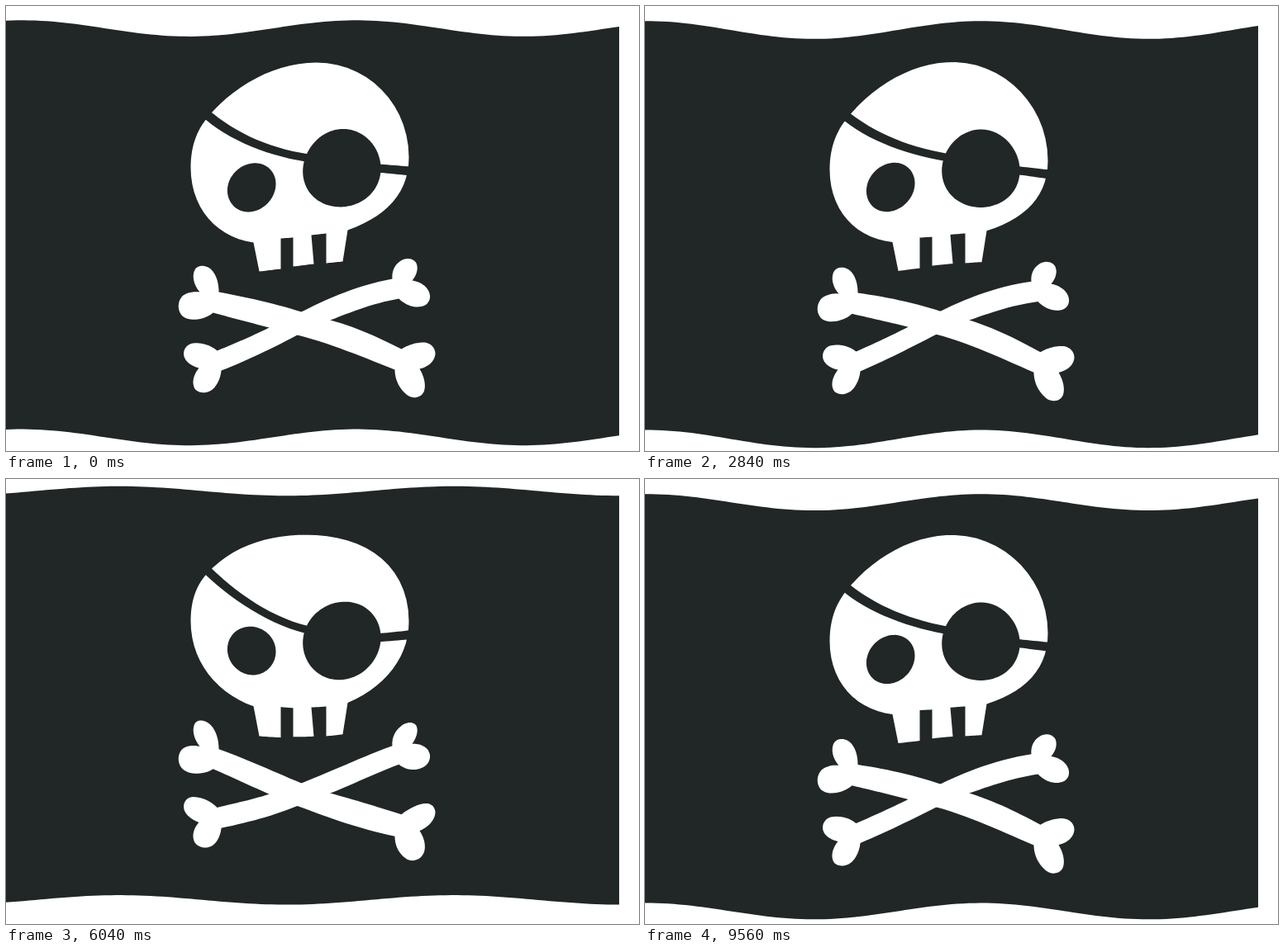
Animation of 766 by 539 pixels, one loop 9.6 s. Source, as an HTML page:

```html
<!DOCTYPE html>
<html lang="en">
<head>
<meta charset="utf-8">
<title>Pirate flag</title>
<style>
html, body { margin: 0; width: 100%; height: 100%; overflow: hidden; background: #fff; }
svg { display: block; width: 766px; height: 539px; }
</style>
</head>
<body>
<svg id="stage" viewBox="0 0 766 539"></svg>
<script>
const LOOP = 9600, STEP = 40, WAVE_MS = 960, SWELL_MS = 4800;
const DARK = '#212626', WHITE = '#fff';
const TAU = Math.PI * 2;
const K = TAU / 405;
const PIN = TAU / 12;

// Wave height swells and fades twice per loop.
const SWELL = [9.8, 8.1, 5.8, 6.3, 8.7, 11.5, 13.2, 11.3];

function height(t) {
  const n = SWELL.length;
  const p = (t % SWELL_MS) / SWELL_MS * n;
  const i = Math.floor(p), f = p - i;
  const [a, b, c, d] = [-1, 0, 1, 2].map(o => SWELL[(i + o + n) % n]);
  return b + f / 2 * (c - a + f * (2 * a - 5 * b + 4 * c - d + f * (3 * (b - c) + d - a)));
}

// Vertical shift at time t: a travelling wave, held still near the middle of the flag.
function waveAt(t) {
  const h = height(t), phase = TAU * t / WAVE_MS;
  const pin = Math.cos(phase + PIN);
  return x => h * (pin - Math.cos(K * (x - 19) - phase));
}

// Flattens an absolute M/L/C path, keeping its corners exact.
function flatten(d) {
  const pts = [];
  let x = 0, y = 0;
  for (const [, cmd, args] of d.matchAll(/([MLC])([^MLC]*)/g)) {
    const v = args.trim().split(/\s+/).map(Number);
    if (cmd === 'M') {
      pts.push([v[0], v[1]]);
    } else {
      const c = cmd === 'C' ? v : [x, y, ...v, ...v];
      for (let i = 1; i <= 14; i++) {
        const s = i / 14, r = 1 - s;
        const mix = (p0, p1, p2, p3) =>
          r * r * r * p0 + 3 * r * r * s * p1 + 3 * r * s * s * p2 + s * s * s * p3;
        pts.push([mix(x, c[0], c[2], c[4]), mix(y, c[1], c[3], c[5])]);
      }
    }
    [x, y] = v.slice(-2);
  }
  return pts;
}

// Paths name pixel centres as they lie at time zero, so take that wave out again.
const rest = waveAt(0);
const drawn = d => flatten(d).map(([x, y]) => [x + 0.5, y + 0.5 - rest(x + 0.5)]);

function circle(cx, cy, r) {
  return Array.from({ length: 90 }, (_, i) => {
    const a = TAU * i / 90;
    return [cx + r * Math.cos(a), cy + r * Math.sin(a)];
  });
}

function banner(width, top, bottom) {
  const up = [], down = [];
  for (let x = 0; x <= width; x += 7) {
    up.push([x, top]);
    down.unshift([x, bottom]);
  }
  return [...up, ...down];
}

const SKULL = `M299 286 C255 280 223 245 223 195 C223 172 229 152 243 135
  C275 96 325 68 375 68 C437 68 487 118 487 183 C487 226 460 254 413 271
  L407 309 L387 311 L387 275 L369 277 L372 312 L347 315 L347 280 L332 281 L332 318 L306 321 L299 286`;

const STRAP_LEFT = 'M249 129 C281 155 320 172 366 179 L362 188 C318 181 273 164 241 137 L236 132 L244 125 L249 129';
const STRAP_RIGHT = 'M449 191 L490 194 L490 205 L449 201 L449 191';

const BONE_DOWN = `M257 346 C290 352 325 360 357 370 C370 374 380 377 392 380
  C425 389 452 402 478 415 C486 410 496 407 504 407 C513 407 519 413 519 421
  C518 431 509 437 500 439 C506 449 508 460 505 467 C501 475 490 476 483 469
  C474 461 470 450 470 440 C432 425 392 408 352 398 C340 395 330 392 318 389
  C295 383 272 377 250 371 C241 379 222 383 213 375 C206 368 207 356 214 350
  C220 346 228 345 234 346 C227 338 224 327 228 319 C232 312 243 313 249 320
  C255 327 257 337 257 346`;

const BONE_UP = `M255 417 C277 408 298 399 318 389 C332 381 345 376 357 370
  C390 353 428 337 467 330 C466 321 470 313 476 309 C482 304 492 304 496 311
  C499 318 496 326 491 332 C499 333 508 338 511 345 C515 353 511 361 504 363
  C494 366 483 362 475 354 C446 359 420 369 392 380 C378 386 365 392 352 398
  C322 414 291 429 260 441 C259 452 253 463 246 466 C238 470 229 467 227 461
  C224 453 228 444 233 438 C225 436 217 431 215 424 C213 416 218 409 226 408
  C238 407 248 411 255 417`;

const stage = document.getElementById('stage');

function shape(pts, fill) {
  const el = document.createElementNS('http://www.w3.org/2000/svg', 'path');
  el.setAttribute('fill', fill);
  stage.appendChild(el);
  return { el, pts };
}

const shapes = [
  shape(banner(742, 18.6, 513.9), DARK),
  shape(drawn(SKULL), WHITE),
  shape(drawn(STRAP_LEFT), DARK),
  shape(drawn(STRAP_RIGHT), DARK),
  shape(circle(297.2, 207.6, 29.3), DARK),
  shape(circle(406.4, 197.1, 47.2), DARK),
  shape(drawn(BONE_DOWN), WHITE),
  shape(drawn(BONE_UP), WHITE)
];

function render(t) {
  const wave = waveAt(t);
  for (const { el, pts } of shapes) {
    const line = pts.map(([x, y]) => x.toFixed(2) + ' ' + (y + wave(x)).toFixed(2));
    el.setAttribute('d', 'M' + line.join('L') + 'Z');
  }
}

function tick() {
  const t = performance.now() % LOOP;
  render(Math.floor(t / STEP) * STEP);
  requestAnimationFrame(tick);
}

render(0);
requestAnimationFrame(tick);
</script>
</body>
</html>
```
